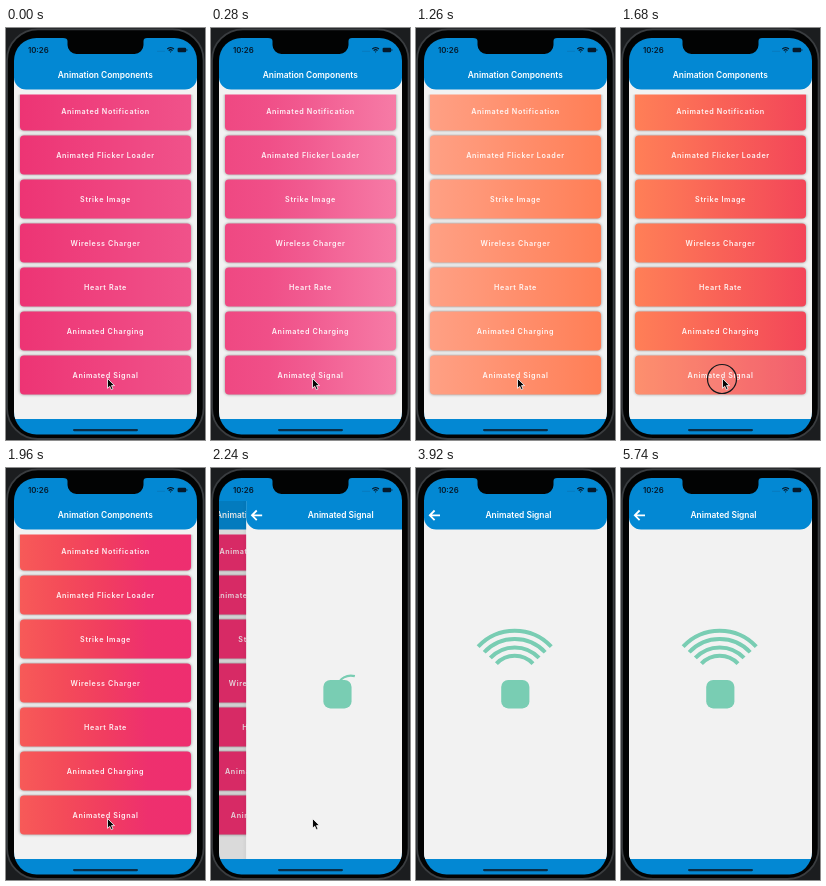
An HTML page for the animation above (5880 ms loop, 199x412 px).

```html
<!DOCTYPE html>
<html lang="en">
<head>
<meta charset="utf-8">
<title>Animated Signal</title>
<style>
html, body { margin: 0; width: 100%; height: 100%; overflow: hidden; background: #1b1d1f; }
svg { display: block; width: 199px; height: 412px; }
text { font-family: Inter, Roboto, sans-serif; font-weight: 600; fill: #fff; text-anchor: middle; }
.title { font-size: 8.4px; }
.label { font-size: 7.2px; letter-spacing: .62px; fill-opacity: .92; }
.clock { font-size: 7.8px; fill: #061a2c; }
.card { filter: drop-shadow(0 .8px 1.8px rgba(0, 0, 0, .42)); }
.blue { fill: #0388d3; }
.page { fill: #f2f2f2; }
.mint { fill: #79cdb3; }
.arc { fill: none; stroke: #79cdb3; stroke-width: 4; }
</style>
</head>
<body>
<svg viewBox="0 0 199 412">
  <defs>
    <linearGradient id="flow">
      <stop offset="0"/><stop offset=".25"/><stop offset=".5"/><stop offset=".75"/><stop offset="1"/>
    </linearGradient>
    <linearGradient id="edge">
      <stop offset="0" stop-color="#000" stop-opacity="0"/>
      <stop offset="1" stop-color="#000" stop-opacity=".04"/>
    </linearGradient>
    <clipPath id="glass"><rect x="8" y="10" width="183" height="396.5" rx="22.5"/></clipPath>
    <clipPath id="view"><rect x="8" y="33" width="183" height="358"/></clipPath>
    <clipPath id="list"><rect x="8" y="66.5" width="183" height="325"/></clipPath>
  </defs>

  <rect x="1" y="1.4" width="196.6" height="409.6" rx="31" fill="#020303" stroke="#3a3d40" stroke-width="1.8"/>

  <g clip-path="url(#glass)">
    <rect class="blue" x="8" y="10" width="183" height="397"/>
    <g clip-path="url(#view)">
      <g id="home">
        <rect class="page" x="8" y="33" width="183" height="358"/>
        <path class="blue" d="M8 33H191V49.600a12 12 0 0 1-12 12H20a12 12 0 0 1-12-12Z"/>
        <text class="title" x="99.3" y="50">Animation Components</text>
        <g id="cards" clip-path="url(#list)"></g>
        <rect id="dim" x="8" y="33" width="183" height="358"/>
      </g>
      <g id="detail">
        <rect x="4" y="33" width="4" height="358" fill="url(#edge)"/>
        <rect class="page" x="8" y="33" width="183" height="358"/>
        <path class="blue" d="M8 33H191V49.600a12 12 0 0 1-12 12H20a12 12 0 0 1-12-12Z"/>
        <text class="title" x="102.5" y="50">Animated Signal</text>
        <path d="M24 47.3H14M18.6 42.5L13.8 47.3L18.6 52.1" fill="none" stroke="#fff" stroke-width="1.8"/>
        <g id="arcs"></g>
        <rect class="mint" x="85.2" y="212" width="28.2" height="28.4" rx="7"/>
      </g>
    </g>
    <path d="M57 10H141Q137.500 10 137.500 13V17a9 9 0 0 1-9 9H70.500a9 9 0 0 1-9-9V13Q61.500 10 57 10Z" fill="#020303"/>
    <text class="clock" x="32.3" y="25">10:26</text>
    <g fill="none" stroke="#061a2c">
      <path d="M151.500 23.300H158.500" stroke="#0b6cab" stroke-dasharray="1 1"/>
      <path d="M161.300 21a4.600 4.600 0 0 1 6.600 0M162.700 22.600a2.700 2.700 0 0 1 3.800 0" stroke-width="1.3"/>
    </g>
    <path d="M163.600 23.500h2l-1 1.300Z" fill="#061a2c"/>
    <rect x="171.600" y="19.700" width="8.600" height="4.600" rx="1.200" fill="#061a2c"/>
    <rect x="180.600" y="21.200" width=".7" height="1.600" fill="#061a2c"/>
    <rect x="67" y="401" width="65" height="2.200" rx="1.100" fill="#0b2d45"/>
  </g>

  <circle id="ring" cx="101" cy="351" r="14.5" fill="#fff" fill-opacity=".06" stroke="#15191c" stroke-width="1.2"/>
  <path id="pointer" d="M101.500 350.500V360.300L103.700 358.200L105.300 361.700L107 360.900L105.500 357.600H108.500Z"
    fill="#050505" stroke="#fff" stroke-width=".8" stroke-linejoin="round"/>
</svg>

<script>
const LOOP = 5880, TICK = 140, SPAN = 430;
const PUSH = { at: 1960, time: 595 };
const WIDTH = 183;
const labels = ["Animated Notification", "Animated Flicker Loader", "Strike Image",
  "Wireless Charger", "Heart Rate", "Animated Charging", "Animated Signal"];

// Colours that stream leftwards through every card: [ms, r, g, b]
const stream = [
  [0, 237, 52, 116], [430, 240, 82, 138], [700, 246, 122, 166], [1150, 251, 157, 150],
  [1260, 255, 160, 132], [1690, 255, 126, 86], [2120, 243, 68, 89], [2300, 238, 46, 112]
];

const $ = id => document.getElementById(id);
const clamp = x => Math.min(1, Math.max(0, x));
const mix = (a, b, k) => a + (b - a) * k;
const easeOut = x => 1 - (1 - x) ** 3;

function add(parent, tag, attrs, text = "") {
  const el = document.createElementNS("http://www.w3.org/2000/svg", tag);
  for (const key in attrs) el.setAttribute(key, attrs[key]);
  el.textContent = text;
  return parent.appendChild(el);
}

function streamColour(t) {
  let i = 0;
  while (i < stream.length - 2 && t > stream[i + 1][0]) i++;
  const a = stream[i], b = stream[i + 1];
  const k = clamp((t - a[0]) / (b[0] - a[0]));
  return `rgb(${[1, 2, 3].map(c => Math.round(mix(a[c], b[c], k)))})`;
}

const cards = labels.map((label, i) => {
  const mid = 83 + 44 * i;
  const g = add($("cards"), "g", {});
  add(g, "rect", { class: "card", x: 14, y: mid - 19.5, width: 171, height: 39, rx: 4, fill: "url(#flow)" });
  add(g, "text", { class: "label", x: 99.5, y: mid + 2.7 }, label);
  return g;
});

// Each arc is drawn around the middle of its chord
const arcs = [25, 33.3, 41.7, 50].map((r, i) => {
  const half = r * Math.sin(0.82), rise = r * Math.cos(0.82);
  const el = add($("arcs"), "path", { class: "arc", d: `M${-half} 0A${r} ${r} 0 0 1 ${half} 0` });
  return { el, y: 212.7 - rise, scale: 0.55 * 25 / r, start: 2240 + 280 * i };
});

const stops = [...document.querySelectorAll("#flow stop")];
const show = (el, on) => el.setAttribute("visibility", on ? "inherit" : "hidden");

function draw(t) {
  stops.forEach((s, i) => s.setAttribute("stop-color", streamColour(t + SPAN * i / 4)));

  const p = easeOut(clamp((t - PUSH.at) / PUSH.time));
  $("home").setAttribute("transform", `translate(${-0.3 * WIDTH * p})`);
  $("detail").setAttribute("transform", `translate(${WIDTH * (1 - p)})`);
  $("dim").setAttribute("opacity", 0.115 * p);
  show($("detail"), p > 0);

  show($("ring"), t >= 1540 && t < 1820);
  cards[6].setAttribute("opacity", t >= 1680 && t < 1960 ? 0.85 : 1);
  show($("pointer"), t < 3360);

  for (const a of arcs) {
    const k = easeOut(clamp((t - a.start) / 700));
    show(a.el, t >= a.start);
    a.el.setAttribute("transform", `translate(${mix(108, 98.7, k)} ${mix(213.2, a.y, k)}) ` +
      `rotate(${mix(-30, 0, k)}) scale(${mix(a.scale, 1, k)})`);
  }
}

const begin = performance.now();
function frame() {
  const t = (performance.now() - begin) % LOOP;
  draw(Math.floor(t / TICK) * TICK);
  requestAnimationFrame(frame);
}
frame();
</script>
</body>
</html>
```
